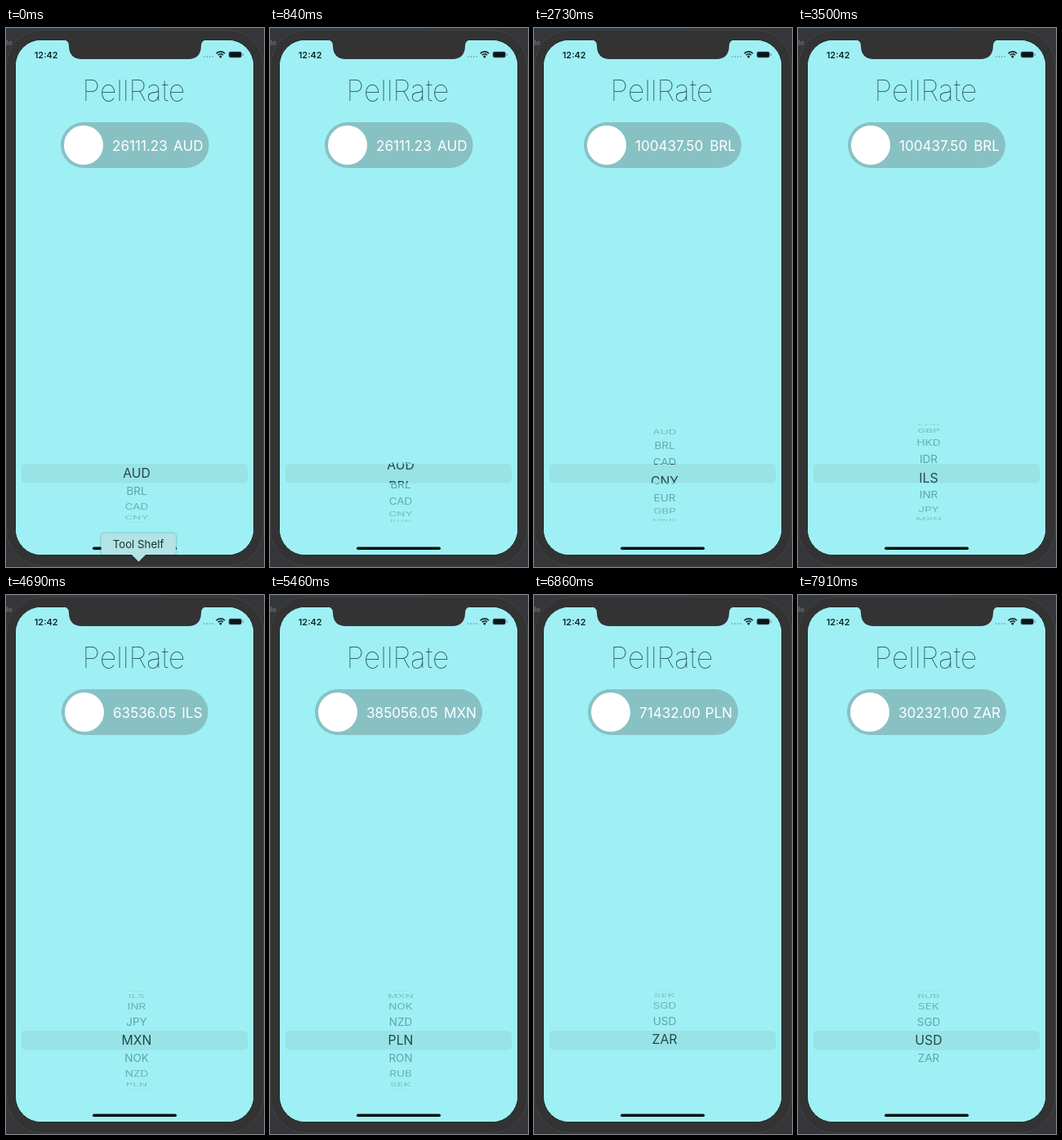
Animation, 316 px wide and 658 px high, one loop 8000 ms. Source, as an HTML page with a canvas:

```html
<!DOCTYPE html>
<html lang="en">
<head>
<meta charset="utf-8">
<title>Currency picker</title>
<style>
  html, body { margin: 0; height: 100%; overflow: hidden; background: #333; }
  canvas { display: block; width: 316px; height: 658px; }
</style>
</head>
<body>
<canvas id="stage"></canvas>
<script>
const LOOP = 8000, STEP = 70;
const FONT = 'Inter, sans-serif';
const SCREEN = '#9ff0f4', BEZEL = '#333334', RIM = '#1f2627';
const CODES = 'AUD BRL CAD CNY EUR GBP HKD IDR ILS INR JPY MXN NOK NZD PLN RON RUB SEK SGD USD ZAR'.split(' ');

// Wheel: projected radius, angle per row, centre line, highlight band
const WHEEL = { x: 160, y: 543.5, radius: 60, angle: 0.375, zoom: 1.17 };
const BAND = { x: 19, y: 532, w: 277, h: 23.5 };

// [start ms, end ms, from row, to row]
const SCROLLS = [
  [740, 1260, 0, 1],
  [2620, 3040, 1, 4],
  [3080, 3770, 4, 8],
  [3950, 4410, 8, 11],
  [4690, 5390, 11, 14],
  [6130, 6720, 14, 20.15],
  [6720, 7140, 20.15, 20],
  [7450, 7890, 20, 19],
];

// [start ms, amount, code, left, right]
const PRICES = [
  [0, '26111.23', 'AUD', 67, 248.5],
  [1750, '100437.50', 'BRL', 61, 254],
  [4200, '63536.05', 'ILS', 68, 247.5],
  [4900, '385056.05', 'MXN', 55, 260],
  [5880, '71432.00', 'PLN', 66, 250],
  [7560, '302321.00', 'ZAR', 60, 255],
];

const canvas = document.getElementById('stage');
const ctx = canvas.getContext('2d');
const ratio = window.devicePixelRatio || 1;
canvas.width = 316 * ratio;
canvas.height = 658 * ratio;
ctx.scale(ratio, ratio);

const ease = u => 1 - (1 - u ** 1.3) ** 4;

function wheelPosition(t) {
  let row = 0;
  for (const [start, end, from, to] of SCROLLS) {
    if (t < start) break;
    row = from + (to - from) * ease(Math.min(1, (t - start) / (end - start)));
  }
  return row;
}

function box(x, y, w, h, r, fill, stroke) {
  ctx.beginPath();
  ctx.roundRect(x, y, w, h, r);
  ctx.fillStyle = fill;
  ctx.fill();
  if (stroke) {
    ctx.strokeStyle = stroke;
    ctx.lineWidth = 1;
    ctx.stroke();
  }
}

function disc(x, y, r, fill) {
  ctx.beginPath();
  ctx.arc(x, y, r, 0, Math.PI * 2);
  ctx.fillStyle = fill;
  ctx.fill();
}

function text(str, x, y, size, weight, fill, align = 'center') {
  ctx.font = `${weight} ${size}px ${FONT}`;
  ctx.textAlign = align;
  ctx.fillStyle = fill;
  ctx.fillText(str, x, y);
}

function drawPhone() {
  ctx.fillStyle = '#353639';
  ctx.fillRect(0, 0, 316, 658);
  ctx.fillStyle = '#2b3f5e';
  ctx.fillRect(0, 0, 190, 1.5);
  text('de', -3, 21, 9, 400, '#77787b', 'left');
  box(0.5, 2.5, 315, 654, 44, BEZEL, '#424345');
  box(11.5, 14.5, 292, 629, 31.5, SCREEN, RIM);
  box(12, 15, 291, 628, 31, SCREEN);

  ctx.beginPath();
  ctx.moveTo(69, 14);
  ctx.quadraticCurveTo(77, 14.5, 77, 22);
  ctx.quadraticCurveTo(77.5, 38, 93, 38);
  ctx.lineTo(223, 38);
  ctx.quadraticCurveTo(238.5, 38, 239, 22);
  ctx.quadraticCurveTo(239, 14.5, 247, 14);
  ctx.fillStyle = BEZEL;
  ctx.fill();
}

function drawStatusBar() {
  text('12:42', 49.2, 36.5, 10.9, 600, '#10292c');
  for (let i = 0; i < 4; i++) disc(242.5 + i * 3.6, 35, 1, '#76b3b7');

  ctx.strokeStyle = '#10292c';
  ctx.lineWidth = 1.7;
  for (const r of [4.2, 7.2]) {
    ctx.beginPath();
    ctx.arc(262.8, 36, r, -Math.PI * 0.76, -Math.PI * 0.24);
    ctx.stroke();
  }
  disc(262.8, 35, 1.5, '#10292c');

  box(272.5, 28.5, 16.5, 8, 2.4, '#6aa6aa');
  box(273.3, 29.3, 14.9, 6.4, 1.6, '#0c1516');
  box(289.8, 31, 1.2, 3, 0.6, '#5f9b9f');
}

function drawPrice(t) {
  const [, amount, code, left, right] = PRICES.findLast(p => t >= p[0]);
  box(left, 115, right - left, 56, 28, '#88c1c4');
  disc(left + 28, 143, 24, '#fff');
  text(amount, left + 63, 149.5, 17.1, 400, '#fff', 'left');
  text(code, right - 7, 149.5, 17.1, 400, '#fff', 'right');
}

function drawRows(position, zoom, color, opacity) {
  CODES.forEach((code, i) => {
    const angle = (i - position) * WHEEL.angle;
    if (Math.abs(angle) >= Math.PI / 2) return;
    const depth = Math.cos(angle);
    ctx.save();
    ctx.globalAlpha = opacity * (0.3 + 0.7 * depth);
    ctx.translate(WHEEL.x, WHEEL.y + WHEEL.radius * Math.sin(angle) * zoom);
    ctx.scale(zoom, zoom * depth);
    text(code, 0, 5, 13.5, 400, color);
    ctx.restore();
  });
}

function drawPicker(t) {
  const position = wheelPosition(t);
  box(BAND.x, BAND.y, BAND.w, BAND.h, 5, '#98e3e6');

  ctx.save();
  ctx.beginPath();
  ctx.rect(12, 481, 291, BAND.y - 481);
  ctx.rect(12, BAND.y + BAND.h, 291, 605 - BAND.y - BAND.h);
  ctx.clip();
  drawRows(position, 1, '#2b6a70', 0.6);
  ctx.restore();

  ctx.save();
  ctx.beginPath();
  ctx.rect(BAND.x, BAND.y, BAND.w, BAND.h);
  ctx.clip();
  drawRows(position, WHEEL.zoom, '#26474c', 1);
  ctx.restore();
}

function drawTooltip(t) {
  const alpha = 1 - t / 350;
  if (alpha <= 0) return;
  ctx.save();
  ctx.globalAlpha = alpha;
  ctx.shadowColor = 'rgba(0, 40, 45, .4)';
  ctx.shadowBlur = 3;
  ctx.beginPath();
  ctx.roundRect(116.5, 617, 91.5, 26, 4);
  ctx.moveTo(154, 643);
  ctx.lineTo(162.5, 651.5);
  ctx.lineTo(171, 643);
  ctx.fillStyle = '#b3e3e5';
  ctx.fill();
  ctx.shadowColor = 'transparent';
  text('Tool Shelf', 162, 634.5, 13.3, 400, '#1d3033');
  ctx.restore();
}

function draw(now) {
  const t = Math.floor((now % LOOP) / STEP) * STEP;
  drawPhone();
  drawStatusBar();
  text('PellRate', 156.5, 89, 35.5, 100, '#1f4850');
  drawPrice(t);
  drawPicker(t);
  box(106, 633.6, 103, 3.4, 1.7, '#0a1213');
  drawTooltip(t);
  requestAnimationFrame(draw);
}
requestAnimationFrame(draw);
</script>
</body>
</html>
```
